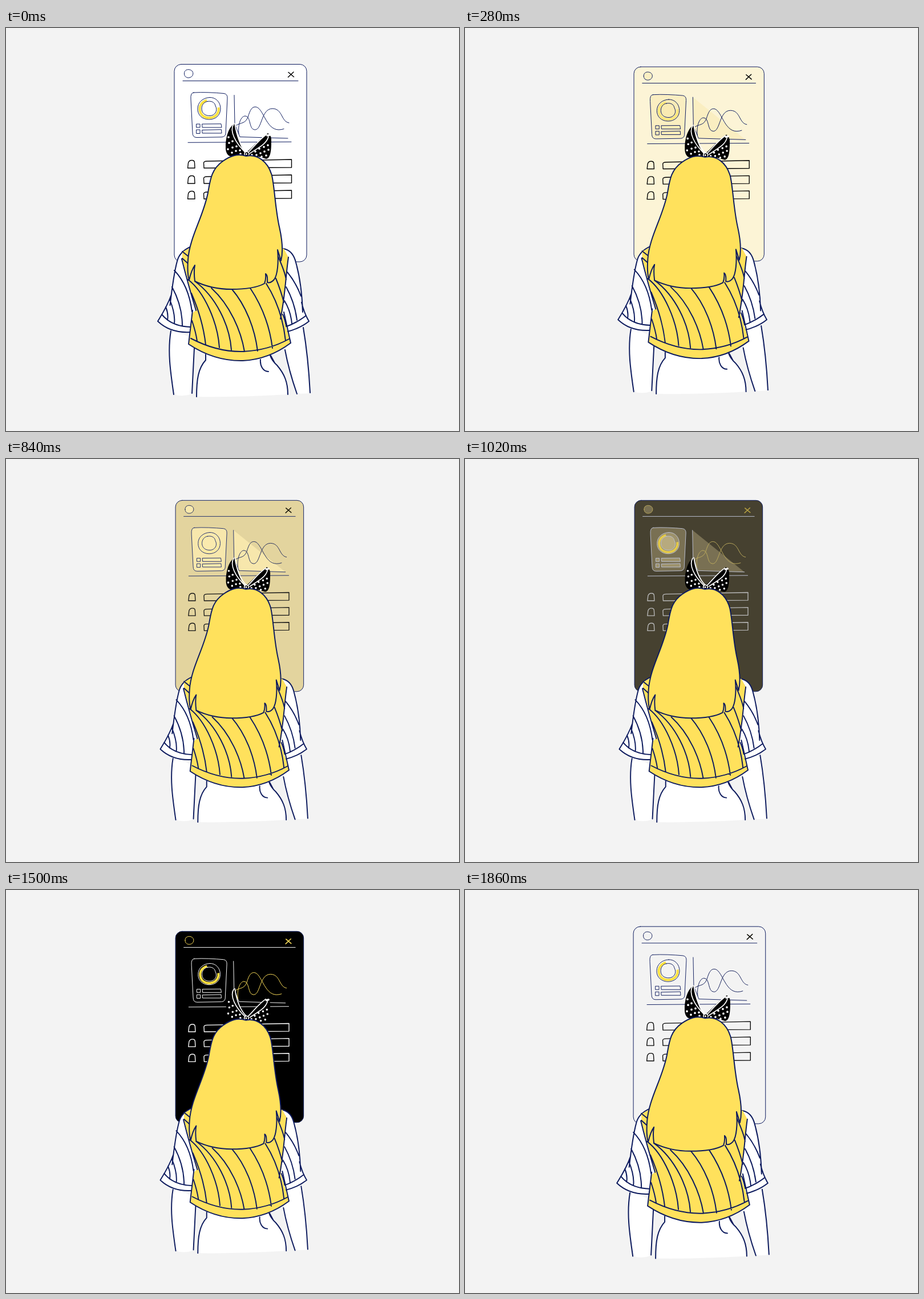
An HTML page for the animation above (1880 ms loop, 794 px wide and 705 px high).

```html
<!DOCTYPE html>
<html lang="en">
<head>
<meta charset="utf-8">
<style>
html, body { margin: 0; width: 100%; height: 100%; overflow: hidden; background: #f3f3f3; }
svg { display: block; width: 100%; height: 100%; stroke-linecap: round; stroke-linejoin: round; }
#screen { stroke: var(--line); fill: none; stroke-width: 1; }
#screen .fill { fill: #faeaae; fill-opacity: var(--tint); }
#screen .accent { stroke: var(--accent); }
#screen .row { stroke: var(--row); stroke-width: 1.4; }
#screen .cross { stroke: var(--cross); stroke-width: 1.5; }
#girl { stroke: #0d1b5e; stroke-width: 2; fill: none; }
#girl .white { fill: #fff; }
#girl .yellow { fill: #ffe15c; }
#girl .bare { stroke: none; }
#bow { stroke: #fff; stroke-width: 1.7; }
</style>
</head>
<body>
<svg viewBox="0 0 794 705">
  <g id="screen">
    <rect id="panel" x="295" y="63.5" width="232" height="345.5" rx="12" stroke="#0d1b5e"/>
    <path d="M310 92.5H512M319 200.3L500 199.2"/>
    <path class="fill accent" d="M312.500 80C312 75 316 72.500 320 72.700C325 73 328 76 327.800 80C327.500 85 323 87.200 319 87C315 86.500 312.500 84 312.500 80Z"/>
    <path class="cross" d="M495 77.500L504.500 85.500M504 77L494.500 86"/>
    <path class="fill" d="M329 113C345 112 365 113 382 114.500Q388.500 115.500 388 123L385 185Q384 190.500 378 190.800L334 191.500Q327 191.500 327 183L324 125Q323 113 329 113Z"/>
    <path class="fill" d="M357 121.500C368 121 376 130 376 141C376 153 367 160 356 160C344 160 335.500 152 336 141C336 130 345 122 357 121.500Z"/>
    <path id="arc" d="M352 126.500C343 129 338 137 340 145C342 154 350 158 358 157C368 156 374 148 372.500 139" stroke="#ffe13f" stroke-width="4" stroke-linecap="butt"/>
    <path class="fill" d="M353 128.500C360 127 366 130 367 136C372 145 366 153 358 153.500C349 154 343 149 343 141C343 135 347 129 353 128.500Z"/>
    <path class="fill" d="M334 168H340V174H334ZM344 168L377 167.700L378 174H344.500ZM334 178H340V184.500H334ZM344 178.500L377.500 177.700L378 184H344.500Z"/>
    <path class="fill" d="M400 117.500L401 168L410 190.500L494 193"/>
    <path class="accent" d="M408 185C406 168 412 154 419 154C430 154 425 178 436.500 178C449 178 447 141 467 141C485 141 482 164 496 166M404 170C412 165 419 168 424 156C428 143 431 138 437 138C451 138 455 178 478 178Q483 178 487 176.500"/>
    <g id="rows"></g>
  </g>

  <g id="girl">
    <path class="white bare" d="M289 525C283 565 288 600 294 641Q310 646 326 640L330 545ZM521 520C528 565 531 600 533 639L510 640C503 620 494 590 489 563L486 520ZM350 565V581C337 595 334 615 334 645Q410 646 494 641C494 620 488 605 475 590Q466 582 463 565Z"/>
    <path d="M289 530C283 565 288 600 294 641M330 560L326 639M521 524C528 565 531 600 533 638M489 563C494 590 503 620 510 640M350 571V581C337 595 334 615 334 645M463 573Q466 582 475 590C488 605 494 620 494 641M464 573L471 586M446 580C445 590 450 601 460 601"/>

    <path class="white bare" d="M325 383Q304 391 300 408C294 430 291 450 289 468L266 513Q288 533 323 532L333 493L309 402ZM486 386Q503 389 508 410C515 435 518 460 518 479L531 513Q515 527 488 533L481 508L495 401Z"/>
    <path d="M325 382Q304 391 300 408C294 430 291 455 287.500 485M290 466Q283 486 266 513Q288 534 323 532M273 501Q290 522 323 523M486 386Q503 389 508 410C515 435 519 465 520 497M518 480Q523 500 531 513Q515 526 490 532M526 503Q508 517 489 523L481 509
      M295 424Q320 450 326 496M291 453Q309 486 309 521M287 475Q297 500 295 517M280 488Q285 500 283 511M493 427Q508 445 517 469M491 453Q506 480 510 511M488 477Q499 495 501 517M485 501Q489 510 491 521"/>
    <path class="yellow bare" d="M325 383L309 392L309 404L333 493L326 500L320 553Q365 583 415 582Q460 580 499 550L496 540L484 502L495 401L487 386Z"/>
    <path d="M308 404Q319 448 333 494M327 494L320 553Q365 583 415 582Q460 580 499 551L487 497M324 543Q370 567 415 566Q460 564 496 544M495 401C490 435 490 465 481 509
      M309 403L319 412M309 391L319 399M319 440C348 462 371 515 374 559M331 443C368 470 392 520 395 563M360 455C393 485 412 530 418 566M396 457C420 485 436 525 441 565M428 455C448 485 462 520 467 560M456 447C474 475 486 510 490 547M473 438Q482 460 487 480M477 400Q489 427 491 440M325 464Q345 510 350 554M326 512Q333 533 335 548"/>

    <g id="bow">
      <path fill="#000" stroke="none" d="M421 222C410 208 404 188 401 167C391 172 385 190 385 207C384 222 393 227 399 224Q409 220 421 226ZM421 218C432 209 445 193 459 184Q466 188 465 199C465 217 463 228 456 229Q437 222 421 226Z"/>
      <path d="M399 168C391 180 402 201 420 218M401 167C404 188 411 206 422 217M425 217C436 206 445 194 457 186M428 219C441 210 457 203 460 190"/>
      <path d="M458 188L462 187" stroke-width="3.500"/>
      <circle cx="422" cy="220.500" r="4" fill="#000"/>
      <circle cx="421.500" cy="220.500" r="1.500" fill="#fff" stroke="none"/>
      <path id="dots" stroke-width="3.700"/>
    </g>
    <path class="yellow" d="M421 224C405 219 393 224 380 233C360 247 358 265 354 288C346 330 322 365 319 405C318 420 318 432 321 441C323 432 326 422 331 415C329 425 330 435 331 443Q360 457 395 457Q435 457 453 447Q456 440 455 430Q459 432 458 445Q464 447 470 440C476 432 478 410 476 388L482 407C485 395 485 375 479.500 350C472 318 471 280 466 258C459 233 440 220 421 224Z"/>
  </g>
</svg>
<script>
const LOOP = 1880;
const NAVY = [13, 27, 94], WHITE = [255, 255, 255], BLACK = [0, 0, 0];
const CREAM = [250, 234, 174], YELLOW = [255, 225, 92];
const byId = id => document.getElementById(id);
const screenGroup = byId('screen'), girl = byId('girl');

byId('rows').innerHTML = [0, 27, 54].map(y => `<path class="row" transform="translate(0 ${y})"
  d="M318.500 245L319.500 236Q321 231.500 325 231.500H327Q330.500 232 330.500 236L331 245ZM347 245L346.500 236Q347 233 352 233L500.500 230V244Z"/>`).join('');

const dots = [[390, 191], [391, 201], [397, 198], [389, 212], [397, 209], [404, 207], [403, 215],
  [396, 218], [410, 214], [411, 220], [459, 205], [452, 208], [460, 213], [453, 216], [444, 211],
  [446, 219], [437, 216], [439, 222], [456, 223], [448, 225], [431, 222]];
byId('dots').setAttribute('d', dots.map(([x, y]) => `M${x} ${y}h.01`).join(''));

const progress = (t, from, to) => Math.min(1, Math.max(0, (t - from) / (to - from)));
const mix = (a, b, p) => a.map((v, i) => v + (b[i] - v) * p);
const rgb = c => `rgb(${c.map(Math.round)})`;
const scaleAbout = (x, y, s) => `translate(${x} ${y}) scale(${s}) translate(${-x} ${-y})`;

function draw(t) {
  const press = progress(t, 0, 420) ** 1.7;
  const darken = 1 - (1 - progress(t, 820, 1200)) ** 1.7;
  const release = progress(t, 1682, 1870);

  const scale = 1 - 0.032 * press * (1 - release);
  screenGroup.setAttribute('transform', scaleAbout(360, 340, scale));
  girl.setAttribute('transform', scaleAbout(405, 340, scale));

  const tint = press * (1 - darken);
  const light = darken * (1 - release);
  const panel = mix(mix(mix(WHITE, CREAM, press), BLACK, darken), WHITE, release);
  byId('panel').setAttribute('fill', rgb(panel));
  byId('arc').setAttribute('opacity', 1 - tint);

  const vars = {
    tint,
    line: rgb(mix(NAVY, WHITE, light)),
    accent: rgb(mix(NAVY, YELLOW, light)),
    row: rgb(mix(BLACK, WHITE, light)),
    cross: rgb(mix(BLACK, YELLOW, light))
  };
  for (const name in vars) screenGroup.style.setProperty('--' + name, vars[name]);
}

const start = performance.now();
function frame() {
  draw((performance.now() - start) % LOOP);
  requestAnimationFrame(frame);
}
draw(0);
requestAnimationFrame(frame);
</script>
</body>
</html>
```
